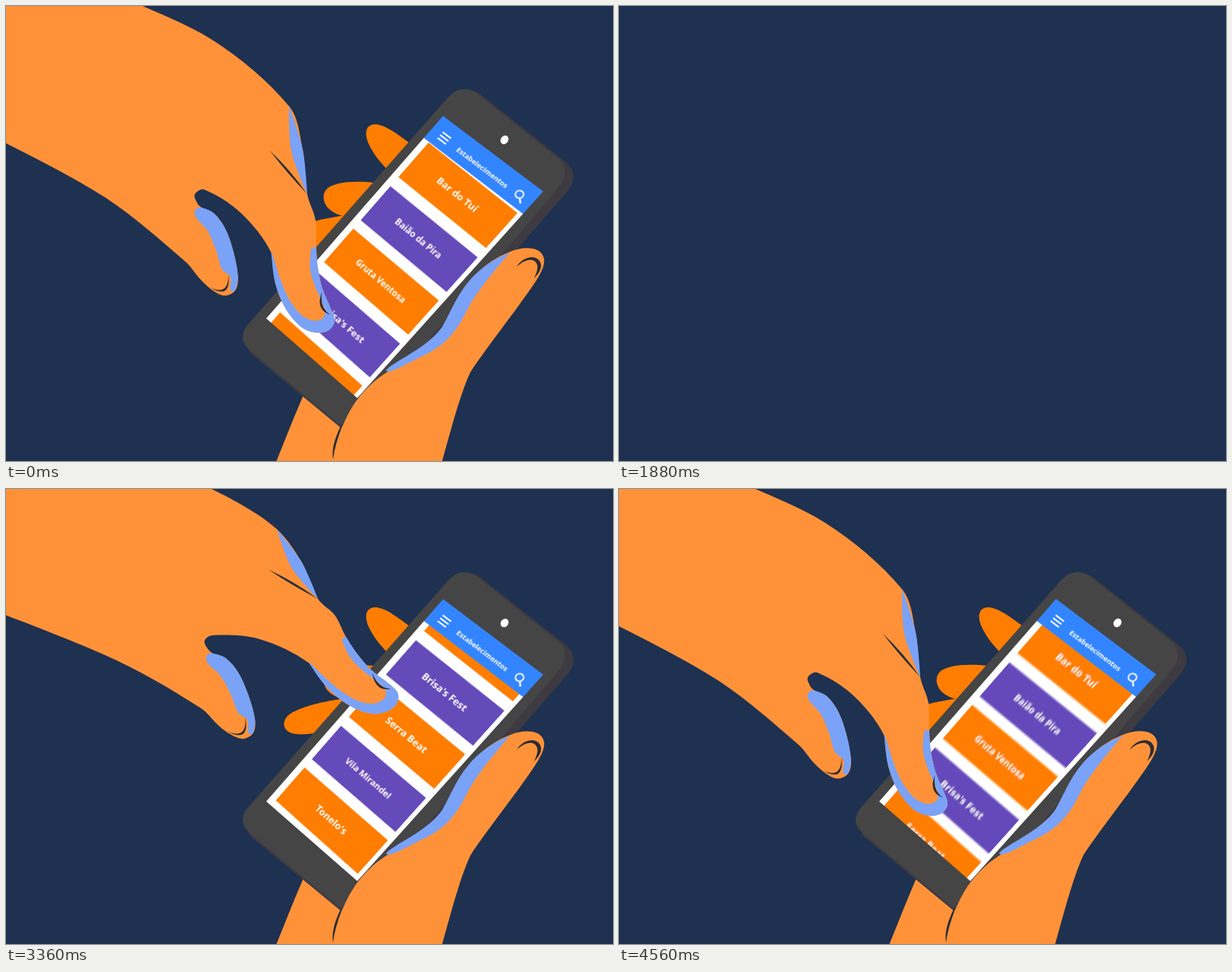
These frames come from a looping animation (800 px wide and 600 px high, 4600 ms). An HTML page:

```html
<!DOCTYPE html>
<html lang="pt">
<head>
<meta charset="utf-8">
<title>Lista no celular</title>
<style>
html, body { margin: 0; width: 100%; height: 100%; overflow: hidden; background: #1e3150; }
#stage { position: absolute; left: 0; top: 0; width: 800px; height: 600px; overflow: hidden; background: #1e3150; }
#stage svg { position: absolute; left: 0; top: 0; overflow: visible; }
#phone { position: absolute; left: 0; top: 0; width: 800px; height: 600px; transform-origin: -75px 590px; }
#screen { position: absolute; left: 0; top: 0; width: 164px; height: 360px; overflow: hidden; background: #fff;
  transform-origin: 0 0; font-family: "Open Sans", "Noto Sans", sans-serif; font-weight: 700; color: #fff; }
#list { position: absolute; left: 0; top: 0; width: 164px; height: 600px; transform-origin: 0 0; }
.card { position: absolute; left: 9px; width: 149px; height: 60.4px; line-height: 59px;
  text-align: center; white-space: nowrap; }
#bar { position: absolute; left: 0; top: 0; width: 164px; height: 38px; background: #3385ff; }
#bar span { position: absolute; left: 0; width: 169px; top: 14px; line-height: 18px; text-align: center; font-size: 9.3px; }
</style>
</head>
<body>
<div id="stage">
  <div id="phone">
    <svg width="800" height="600">
      <g fill="#ff7d00">
        <path d="M536,184 C515,168 500,157 487,156 C474,156 471,168 479,184 C486,198 495,208 503,216 Z"/>
        <path d="M486,233 C455,230 432,233 423,241 C416,248 418,259 424,266 C431,273 440,277 450,278 Z"/>
        <path d="M450,276 C420,279 390,287 375,296 C364,304 364,314 372,320 C380,325 398,324 412,321 Z"/>
      </g>
      <path fill="#ff9239" d="M395,506 C378,545 363,585 340,640 L470,640 L470,520 Z"/>
      <path fill="#3d3a42" d="M606,110 Q616,110 626,117 L737,205 Q757,222 741,243 L470,556 L441,556 L320,456 Z"/>
      <path fill="#454545" d="M583,120 Q600,102 620,115 L729,202 Q743,215 731,236 L468,545 L440,552 L320,453 Q305,438 318,421 Z"/>
      <ellipse cx="657" cy="176.500" rx="5" ry="6" transform="rotate(35 657 176.500)" fill="#fff"/>
    </svg>
    <div id="screen">
      <div id="list"></div>
      <div id="bar">
        <span>Estabelecimentos</span>
        <svg width="164" height="38" fill="none" stroke="#fff">
          <path stroke-width="2" d="M14,17 h14 M14,22 h14 M14,27 h14"/>
          <circle cx="144" cy="21" r="5" stroke-width="1.800"/>
          <path stroke-width="2.200" d="M147.500,24.500 l5,5"/>
        </svg>
      </div>
    </div>
    <svg width="800" height="600">
      <path fill="#ff9239" d="M420,640 C430,600 434,575 444,553 C454,530 464,515 480,500 C500,480 540,463 565,440
        C592,410 600,350 662,325 C682,316 706,317 709,333 C711,344 702,358 690,375 C665,411 630,455 612,483
        C598,513 586,560 564,640 Z"/>
      <path fill="#7aa2f7" d="M501,480 C515,466 554,452 575,423 C592,395 602,350 664,325
        C643,350 622,374 608,400 C594,430 578,447 554,459 C533,469 515,480 505,482 Q501,482 501,480 Z"/>
      <path fill="#2a2c36" d="M673,344 C680,331 700,325 705,340 C706,348 701,354 696,359 C700,350 702,344 699,339
        C694,331 682,335 673,344 Z M441,554 C433,571 429,585 431,598 C433,583 437,570 442,557 Z"/>
    </svg>
  </div>
  <svg id="hand" width="800" height="600">
    <defs>
      <filter id="smear" x="-5%" y="-5%" width="110%" height="110%"><feGaussianBlur stdDeviation="0 0"/></filter>
    </defs>
  </svg>
</div>
<script>
const LOOP = 4600, CUT = 1880, STEP = 40;
const $ = id => document.getElementById(id);
const clamp = x => Math.min(1, Math.max(0, x));
const ease = {
  in: x => x * x,
  out: x => 1 - (1 - x) ** 2,
  both: x => x < .5 ? 2 * x * x : 1 - 2 * (1 - x) ** 2
};

// Screen content
["Bar do Tuí", "Baião da Pira", "Gruta Ventosa", "Brisa's Fest", "Serra Beat", "Vila Mirandel", "Tonelo's"]
  .forEach((name, i) => {
    const card = document.createElement("div");
    card.className = "card";
    card.textContent = name;
    card.style.top = 48 + i * 75.5 + "px";
    card.style.fontSize = (name.length > 12 ? 11.7 : 13) + "px";
    card.style.background = i % 2 ? "#654aba" : "#ff7d00";
    $("list").append(card);
  });

// Projective map of a w x h box onto four corners, clockwise from top left
function project(w, h, [x0, y0], [x1, y1], [x2, y2], [x3, y3]) {
  const ax = x1 - x2, bx = x3 - x2, cx = x0 - x1 + x2 - x3;
  const ay = y1 - y2, by = y3 - y2, cy = y0 - y1 + y2 - y3;
  const det = ax * by - bx * ay;
  const g = (cx * by - bx * cy) / det, k = (ax * cy - cx * ay) / det;
  return `matrix3d(${[(x1 - x0 + g * x1) / w, (y1 - y0 + g * y1) / w, 0, g / w,
    (x3 - x0 + k * x3) / h, (y3 - y0 + k * y3) / h, 0, k / h, 0, 0, 1, 0, x0, y0, 0, 1].map(v => v.toFixed(8))})`;
}
$("screen").style.transform = project(164, 360, [576, 145], [708, 244.5], [463, 517], [343, 412]);

// Rigid parts of the hand, each around its own joint
const pts = s => s.split(" ").map(p => p.split(",").map(Number));
const finger = pts("8,-28 35,-18 62,-12 90,-11 108,-8 115,5 110,21 95,35 65,43 28,41 -10,29");
const fingerCore = finger.map(([x, y]) =>
  [x - .15 * Math.max(0, x), 12 + (y - 12) * (1 - .3 * clamp((x + 20) / 50))]).reverse();
const fingerNail = pts("65,-10 82,-3 97,-7");
const thumb = pts("12,-7 0,0 4,11 11,17 28,23 45,42 59,72 68,104 66,121 53,129 37,124 20,112 -3,90");
const thumbCore = pts("60,122 58,104 46,95 36,72 22,47 3,28 4,19");
const thumbNail = pts("32,120 51,120 55,100");

// Joints: arm edge at the top, knuckle, crease end, fingertip joint and angle, thumb web and angle, lower arm edge
const names = ["topX", "kx", "ky", "cx", "cy", "fx", "fy", "fa", "wx", "wy", "wa", "mx", "my", "leftY"];
const pose = (...v) => Object.fromEntries(names.map((n, i) => [n, v[i]]));
const low = pose(150, 373, 132, 397, 248, 380, 322, 65, 249, 248, 6, 130, 252, 174);
const mid = pose(228, 387, 95, 421, 206, 411, 279, 54, 273, 216, 2, 130, 222, 162);
const high = pose(265, 372, 52, 424, 144, 444, 210, 16, 276, 196, 0, 150, 221, 158);
const curl = pose(203, 326, 56, 384, 147, 383, 216, 79, 232, 207, 3, 140, 238, 168);

// Time, pose, shift to the left, easing of the move that arrives there
const keys = [[2320, curl, 470], [2800, curl, 0, "out"], [3000, curl, 0], [3600, high, 0, "both"], [4040, high, 0],
  [4300, mid, 0, "in"], [4520, low, 0, "out"], [5080, low, 0], [5480, mid, 0, "in"], [6100, high, 0, "out"]];

function handAt(t) {
  let i = keys.findIndex(k => k[0] > t);
  if (i < 0) i = keys.length - 1;
  const [t0, a, s0] = keys[Math.max(0, i - 1)], [t1, b, s1, move = "both"] = keys[i];
  const f = t1 > t0 ? ease[move](clamp((t - t0) / (t1 - t0))) : 0;
  const p = Object.fromEntries(names.map(n => [n, a[n] + (b[n] - a[n]) * f]));
  return [p, s0 + (s1 - s0) * f];
}

const xy = (x, y) => x.toFixed(1) + "," + y.toFixed(1);

function place(shape, x, y, deg) {
  const c = Math.cos(deg * Math.PI / 180), s = Math.sin(deg * Math.PI / 180);
  return shape.map(([u, v]) => [x + u * c - v * s, y + u * s + v * c]);
}

// Middle of a-b, pushed sideways by h
function bulge(a, b, h) {
  const dx = b[0] - a[0], dy = b[1] - a[1], k = h / Math.hypot(dx, dy);
  return [(a[0] + b[0]) / 2 + dy * k, (a[1] + b[1]) / 2 - dx * k];
}

// Closed smooth curve through points; listed indices stay sharp
function curve(p, sharp) {
  const n = p.length;
  const dirs = p.map((q, i) => {
    if (sharp.includes(i)) return [0, 0];
    const a = p[(i + n - 1) % n], b = p[(i + 1) % n];
    const len = Math.hypot(b[0] - a[0], b[1] - a[1]) || 1;
    return [(b[0] - a[0]) / len, (b[1] - a[1]) / len];
  });
  let d = "M" + xy(...p[0]);
  p.forEach((a, i) => {
    const j = (i + 1) % n, b = p[j], u = dirs[i], v = dirs[j];
    const len = Math.hypot(b[0] - a[0], b[1] - a[1]) / 3;
    d += `C${xy(a[0] + u[0] * len, a[1] + u[1] * len)} ${xy(b[0] - v[0] * len, b[1] - v[1] * len)} ${xy(...b)}`;
  });
  return d + "Z";
}

// Thin crescent from a to b by way of m
function crescent([a, m, b]) {
  const q = [2 * m[0] - (a[0] + b[0]) / 2, 2 * m[1] - (a[1] + b[1]) / 2];
  const dx = b[0] - a[0], dy = b[1] - a[1], k = 6 / Math.hypot(dx, dy);
  return `M${xy(...a)}Q${xy(...q)} ${xy(...b)}Q${xy(q[0] - dy * k, q[1] + dx * k)} ${xy(...a)}Z`;
}

const [skin, shade, ink] = ["#ff9239", "#7aa2f7", "#2a2c36"].map(fill => {
  const path = document.createElementNS("http://www.w3.org/2000/svg", "path");
  path.setAttribute("fill", fill);
  $("hand").append(path);
  return path;
});

function drawHand([p, shift]) {
  const onFinger = s => place(s, p.fx, p.fy, p.fa), onThumb = s => place(s, p.wx, p.wy, p.wa);
  const tip = onFinger(finger), grip = onThumb(thumb);
  const top = [p.topX, -12], knuckle = [p.kx, p.ky], fold = [p.cx, p.cy];
  const reach = Math.hypot(p.kx - p.topX, p.ky + 12);
  const ridge = bulge(knuckle, fold, 6);
  const foldAngle = Math.atan2(p.cy - p.ky, p.cx - p.kx) * 180 / Math.PI - 29;
  const [foldStart] = place([[-76, 0]], ...fold, foldAngle);

  skin.setAttribute("d", curve([[-900, -400], top, bulge(top, knuckle, reach ** 2 / 3800), knuckle, ridge, fold,
    bulge(fold, tip[0], 5), ...tip, bulge(tip[10], grip[1], -17), ...grip, [p.mx, p.my], [-14, p.leftY]],
    [0, 1, 8 + tip.length + grip.length + 1]));
  shade.setAttribute("d",
    curve([knuckle, ridge, fold, bulge(knuckle, fold, -9)], [0, 2]) +
    curve([...tip, ...onFinger(fingerCore)], [0, 21]) +
    curve([...grip.slice(3, 9), ...onThumb(thumbCore)], [5]));
  ink.setAttribute("d", crescent([foldStart, bulge(foldStart, fold, 2), fold]) +
    crescent(onFinger(fingerNail)) + crescent(onThumb(thumbNail)));
  $("hand").style.transform = `translate(${-shift}px, ${-shift / 4}px)`;
}

const scrollAt = t => 211 * (1 - ease.both(clamp((t - 4156) / 520)));
const blur = document.querySelector("#smear feGaussianBlur");

function draw(now) {
  let t = Math.floor(now % LOOP / STEP) * STEP;
  if (t < CUT) t += LOOP;
  const s = t - CUT;
  const tilt = 36 * clamp(1 - s / 400) ** 3 + 7.2 * clamp(1 - s / 1640) ** 2.75;
  $("phone").style.transform = `rotate(${tilt.toFixed(3)}deg)`;

  const smear = (scrollAt(t - 20) - scrollAt(t + 20)) * .07;
  $("list").style.transform = `translateY(${-scrollAt(t).toFixed(2)}px) skewY(.8deg)`;
  $("list").style.filter = smear > .2 ? "url(#smear)" : "none";
  blur.setAttribute("stdDeviation", "0 " + smear.toFixed(2));
  drawHand(handAt(t));
}

const start = performance.now();
function tick() {
  draw(performance.now() - start);
  requestAnimationFrame(tick);
}
tick();
</script>
</body>
</html>
```
